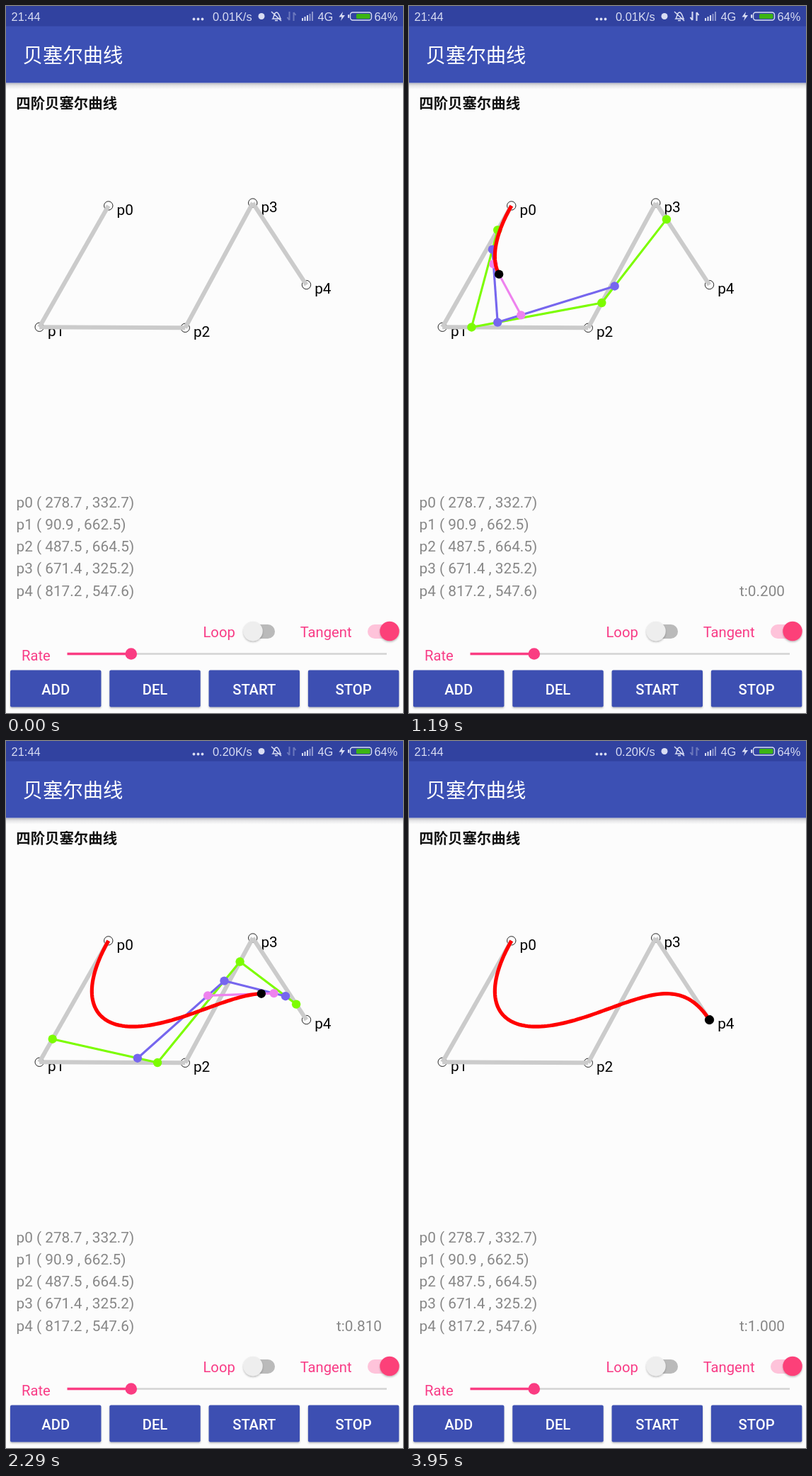
Recreate the animation shown at these times as an HTML page. Size 561 by 998 pixels, loop 4.97 s.

```html
<!DOCTYPE html>
<html lang="zh">
<head>
<meta charset="utf-8">
<style>
html, body { margin: 0; width: 100%; height: 100%; overflow: hidden; background: #fcfcfc; }
svg { display: block; width: 100vw; height: 100vh; font-family: Roboto, "Noto Sans CJK SC", "Noto Sans CJK", sans-serif; }
text { white-space: pre; }
.status { fill: #d9ddf3; font: 16.4px "Liberation Sans", Arial, sans-serif; }
.pink { fill: #f83c86; font-size: 20.2px; }
.info { fill: #878787; font-size: 20.78px; }
.label { fill: #000; font-size: 20.78px; }
.btn { fill: #fff; font-size: 20.2px; font-weight: 500; text-anchor: middle; }
.stroke { fill: none; stroke: #d9ddf3; }
</style>
</head>
<body>
<svg viewBox="0 0 561 998" preserveAspectRatio="none">
  <defs>
    <linearGradient id="shade" x2="0" y2="1">
      <stop stop-color="#223" stop-opacity=".3"/>
      <stop offset=".45" stop-color="#223" stop-opacity=".1"/>
      <stop offset="1" stop-color="#223" stop-opacity="0"/>
    </linearGradient>
    <filter id="drop" x="-20%" y="-20%" width="140%" height="150%">
      <feDropShadow dx="0" dy="1.5" stdDeviation="1.3" flood-color="#333" flood-opacity=".35"/>
    </filter>
  </defs>
  <rect width="561" height="998" fill="#fcfcfc"/>
  <rect y="108.500" width="561" height="9" fill="url(#shade)"/>
  <rect width="561" height="108.500" fill="#3c50b4"/>
  <rect width="561" height="28.500" fill="#3142a0"/>

  <g class="status">
    <text x="7.600" y="21">21:44</text>
    <text id="speed" x="347.600" y="21" text-anchor="end"></text>
    <text x="440.500" y="21">4G</text>
    <text x="520.500" y="21">64%</text>
    <circle cx="265.500" cy="18.500" r="1.900"/>
    <circle cx="271.500" cy="18.500" r="1.900"/>
    <circle cx="277.500" cy="18.500" r="1.900"/>
    <circle cx="361" cy="14.500" r="4.500"/>
    <path class="stroke" d="M377 18c2-2 1-8 5-9c4 0 4 6 6 9zM380 20.500h4M375 8l14 13" stroke-width="1.500"/>
    <path id="down" class="stroke" d="M400.500 8v12M397.500 16l3 4" stroke-width="2"/>
    <path id="up" class="stroke" d="M406.500 21V9M406.500 9l3 4" stroke-width="2"/>
    <path d="M418 17h2v4h-2zM421.500 15h2v6h-2zM425 13h2v8h-2z"/>
    <path d="M428.500 11h2v10h-2zM432 8h2v13h-2z" opacity=".55"/>
    <path d="M476 8l-5.500 7.500h4l-1.500 5.500l6-8h-4z"/>
    <rect class="stroke" x="486.500" y="9" width="30" height="11" rx="3.500" stroke-width="1.400"/>
    <rect x="483" y="12" width="2.200" height="5" rx="1"/>
    <rect x="495" y="11" width="19.500" height="7" rx="1.500" fill="#3cb414"/>
  </g>

  <text x="23.800" y="80.300" font-size="28.3" fill="#fff">贝塞尔曲线</text>
  <text x="14.300" y="145.200" font-size="20.4" font-weight="700" fill="#111">四阶贝塞尔曲线</text>

  <g id="base"></g>
  <g id="live"></g>
  <g id="list"></g>
  <text id="clock" class="info" x="467" y="832.500"></text>

  <text class="pink" x="278.500" y="890.500">Loop</text>
  <text class="pink" x="415.700" y="890.500">Tangent</text>
  <text class="pink" x="22" y="924">Rate</text>
  <rect x="337" y="873" width="43" height="20" rx="10" fill="#bababa"/>
  <circle cx="349" cy="882.500" r="13.700" fill="#eeeeee" filter="url(#drop)"/>
  <rect x="511" y="873" width="43" height="20" rx="10" fill="#fec3da"/>
  <circle cx="542" cy="882.500" r="13.700" fill="#fc4079" filter="url(#drop)"/>
  <path d="M177 914.500H538" stroke="#d3d3d3" stroke-width="2.500"/>
  <path d="M86.500 914.500H177" stroke="#fa3c82" stroke-width="3.500"/>
  <circle cx="176.800" cy="914.500" r="8.300" fill="#fa3c82"/>
  <g id="buttons"></g>
</svg>
<script>
const $ = id => document.getElementById(id);
const SCALE = 561 / 1080, TOP = 109.1;
const LOOP = 4970, BEGIN = 590, STEP = 42.5, LAST = 48;
const coords = [[278.7, 332.7], [90.9, 662.5], [487.5, 664.5], [671.4, 325.2], [817.2, 547.6]];
const pts = coords.map(([x, y]) => [x * SCALE, y * SCALE + TOP]);
const colors = ['#7cfc00', '#7666ee', '#ee82ee'];
// step number, curve parameter
const pace = [[5, 0], [8, .07], [21, .36], [32, .62], [40, .81], [LAST, 1]];

const line = (a, b, color, w) =>
  `<path d="M${a}L${b}" stroke="${color}" stroke-width="${w}"/>`;
const dot = ([x, y], color) => `<circle cx="${x}" cy="${y}" r="6.2" fill="${color}"/>`;
const segments = (p, color, w) => p.slice(1).map((q, i) => line(p[i], q, color, w)).join('');
const reduce = (p, t) => p.slice(1).map((q, i) => q.map((v, j) => p[i][j] + (v - p[i][j]) * t));

function curvePoint(t) {
  let p = pts;
  while (p.length > 1) p = reduce(p, t);
  return p[0];
}

function buildStatic() {
  $('base').innerHTML = pts.map(([x, y], i) =>
    `<circle cx="${x}" cy="${y}" r="6.2" fill="none" stroke="#222" stroke-width="1"/>
     <text class="label" x="${x + 11.7}" y="${y + 12.7}">p${i}</text>`).join('') +
    segments(pts, '#cbcbcb', 6);
  $('list').innerHTML = coords.map(([x, y], i) =>
    `<text class="info" x="14.5" y="${707.9 + i * 31.17}">p${i} ( ${x.toFixed(1)} , ${y.toFixed(1)})</text>`).join('');
  $('buttons').innerHTML = ['ADD', 'DEL', 'START', 'STOP'].map((name, i) => {
    const x = 6 + i * 140.3;
    return `<rect x="${x}" y="937.5" width="128.4" height="52" rx="2" fill="#3c50b2" filter="url(#drop)"/>
      <text class="btn" x="${x + 64.2}" y="972">${name}</text>`;
  }).join('');
}

function paramAt(ms) {
  const k = Math.min(LAST, Math.floor((ms - BEGIN + 5) / STEP));
  if (k < pace[0][0]) return -1;
  const i = Math.max(1, pace.findIndex(p => p[0] >= k));
  const [k0, t0] = pace[i - 1], [k1, t1] = pace[i];
  return Math.round((t0 + (t1 - t0) * (k - k0) / (k1 - k0)) * 100) / 100;
}

function drawCurve(t) {
  if (t < 0) return '';
  let out = '';
  if (t < 1) {
    let p = pts;
    for (const color of colors) {
      p = reduce(p, t);
      out += segments(p, color, 3.1) + p.map(q => dot(q, color)).join('');
    }
  }
  const n = Math.max(1, Math.round(t * 100));
  const path = Array.from({ length: n + 1 }, (_, i) => curvePoint(t * i / n));
  return out + `<path d="M${path.join('L')}" fill="none" stroke="#f00" stroke-width="5.2" stroke-linejoin="round"/>` +
    dot(curvePoint(t), '#000');
}

let shown;
function render(ms) {
  const t = paramAt(ms);
  if (t !== shown) {
    shown = t;
    $('live').innerHTML = drawCurve(t);
    $('clock').textContent = t < 0 ? '' : 't:' + t.toFixed(3);
  }
  const both = ms >= 890 && ms < 1910, upOnly = ms >= 2930 && ms < 3950;
  $('down').setAttribute('opacity', both ? 1 : .35);
  $('up').setAttribute('opacity', both || upOnly ? 1 : .35);
  $('speed').textContent = ms < 1270 ? '0.01K/s' : '0.20K/s';
}

buildStatic();
render(0);
let start;
requestAnimationFrame(function tick(now) {
  start ??= now;
  render((now - start) % LOOP);
  requestAnimationFrame(tick);
});
</script>
</body>
</html>
```
